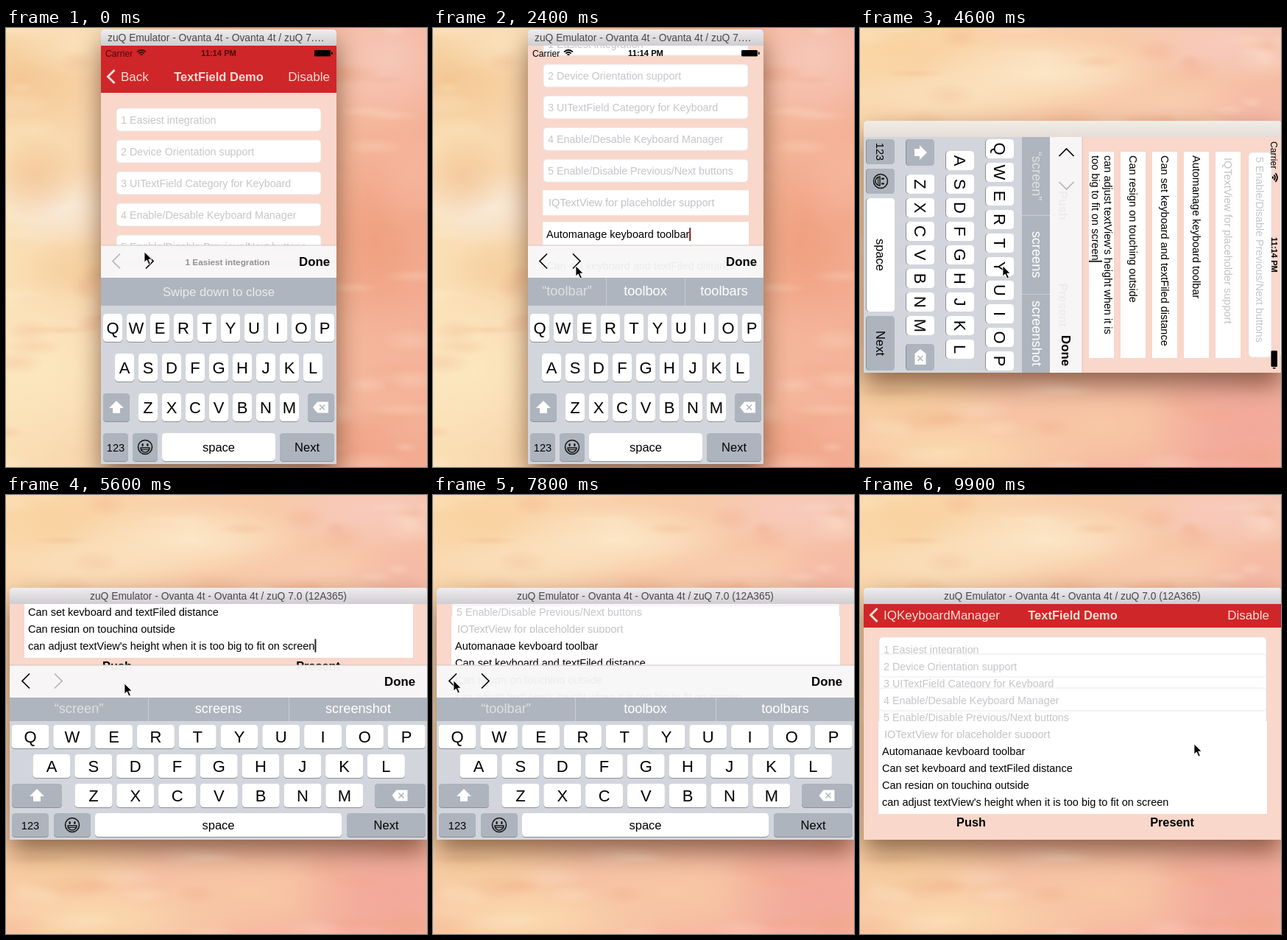
An HTML page with a canvas for the animation above (10 s loop, 572 by 596 pixels).

```html
<!DOCTYPE html>
<html lang="en">
<head>
<meta charset="utf-8">
<title>Keyboard toolbar demo</title>
<style>
html, body { margin: 0; width: 100%; height: 100%; overflow: hidden; }
canvas { display: block; }
</style>
</head>
<body>
<canvas id="stage" width="572" height="596"></canvas>
<script>
const ctx = document.getElementById('stage').getContext('2d');
const LOOP = 10000, TICK = 100, TURN = 4500, SPIN = 4900;
const SANS = '"Liberation Sans", Arial, sans-serif';
const PEACH = '#f9d7ca', RED = '#cf2629', DARK_KEY = '#adb4bd';
const TITLE = 'zuQ Emulator - Ovanta 4t - Ovanta 4t / zuQ 7.';

const FIELDS = ['1 Easiest integration', '2 Device Orientation support',
  '3 UITextField Category for Keyboard', '4 Enable/Desable Keyboard Manager',
  '5 Enable/Disable Previous/Next buttons', 'IQTextView for placeholder support',
  'Automanage keyboard toolbar', 'Can set keyboard and textFiled distance',
  'Can resign on touching outside',
  "can adjust textView's height when it is too big to fit on screen"];

const WORDS = {
  1: ['Swipe down to close'],
  7: ['“toolbar”', 'toolbox', 'toolbars'],
  8: ['“distance”', 'distances', 'distanced'],
  9: ['“outside”', 'outsider', 'outsiders'],
  10: ['“screen”', 'screens', 'screenshot']
};

const PORTRAIT = {
  x: 129, y: 24, w: 320, h: 568, nav: 64, navText: 42, back: 'Back', right: 440,
  fieldX: 150, fieldW: 278, fieldY: 109, step: 43, gap: 42, textY: 16, push: [222, 357, 564],
  arrows: [150, 195], titleX: 301, keysH: 215, predH: 38, padH: 216, bars: [235, 342],
  rowX: [145, 161, 193], rowY: 11, rowStep: 54, keyH: 38, keyW: 26, keyStep: 32,
  shift: [132, 36], del: [410, 36], bottom: [[132, 34], [172, 34], [212, 154], [372, 74]]
};
const LANDSCAPE = {
  wide: true, x: 5, y: 148, w: 568, h: 320, nav: 32, navText: 15, back: 'IQKeyboardManager', right: 556,
  fieldX: 26, fieldW: 526, fieldY: 193, step: 23, gap: 43, textY: 16.5, push: [151, 424, 444.5],
  arrows: [27, 71], titleX: 298, keysH: 161, predH: 32, padH: 162, bars: [193, 384],
  rowX: [33, 62, 119], rowY: 5, rowStep: 40, keyH: 32, keyW: 51, keyStep: 56.8,
  shift: [8, 68], del: [501, 69], bottom: [[8, 50], [65, 50], [121, 335], [463, 107]]
};

// [time, focused field]; 0 means the keyboard is dismissed
const FOCUS = [[0, 1], [300, 2], [600, 3], [900, 4], [1200, 5], [1700, 6], [2200, 7], [2800, 8],
  [3400, 9], [4000, 10], [6300, 9], [6900, 8], [7500, 7], [8000, 6], [8500, 5], [9400, 0]];
// [time, x, y]
const POINTER = [[0, 188, 304], [1200, 188, 305], [1400, 190, 335], [1700, 190, 337], [2000, 194, 323],
  [4700, 194, 323], [5600, 161, 256], [6200, 28, 252], [8400, 28, 252], [8800, 60, 265],
  [9300, 535, 283], [9900, 454, 338]];

const lerp = (a, b, p) => a + (b - a) * p;
const ease = p => { p = Math.min(1, Math.max(0, p)); return p * p * (3 - 2 * p); };

function rect(x, y, w, h, fill, radius = 0) {
  ctx.fillStyle = fill;
  ctx.beginPath();
  ctx.roundRect(x, y, w, h, radius);
  ctx.fill();
}

function line(points, color, width = 1) {
  ctx.strokeStyle = color;
  ctx.lineWidth = width;
  ctx.beginPath();
  points.forEach(([x, y], i) => i ? ctx.lineTo(x, y) : ctx.moveTo(x, y));
  ctx.stroke();
}

function shape(points, fill, stroke) {
  ctx.beginPath();
  points.forEach(([x, y]) => ctx.lineTo(x, y));
  ctx.closePath();
  ctx.fillStyle = fill;
  ctx.fill();
  if (stroke) { ctx.lineWidth = 1; ctx.strokeStyle = stroke; ctx.stroke(); }
}

// y is the middle of the capitals
function text(str, x, y, size, color, align = 'center', weight = 'normal') {
  ctx.font = `${weight} ${size}px ${SANS}`;
  ctx.textAlign = align;
  ctx.fillStyle = color;
  ctx.fillText(str, x, y + size * 0.35);
}

function fitText(str, width) {
  if (ctx.measureText(str).width <= width) return str;
  while (ctx.measureText(str + '…').width > width) str = str.slice(0, -1);
  return str + '…';
}

function glow(x, y, rx, ry, color, alpha) {
  ctx.save();
  ctx.translate(x, y);
  ctx.scale(rx, ry);
  const g = ctx.createRadialGradient(0, 0, 0, 0, 0, 1);
  g.addColorStop(0, color);
  g.addColorStop(0.45, color + '99');
  g.addColorStop(1, color + '00');
  ctx.globalAlpha = alpha;
  ctx.fillStyle = g;
  ctx.fillRect(-1, -1, 2, 2);
  ctx.restore();
}

const SKY = [
  { from: '#fae0b4', to: '#f3ac92', end: [572, 0], seed: 7, glows: [
    [20, 70, 130, 90, '#f3c48f'], [110, 20, 110, 50, '#fbe3bd'], [70, 245, 110, 55, '#f8ecdf'],
    [40, 200, 60, 60, '#f4c79a'], [95, 330, 80, 45, '#f5cf9d'], [50, 460, 150, 120, '#fce9c2'],
    [520, 40, 130, 110, '#f7cbbd'], [500, 290, 90, 130, '#ef9d7c'], [555, 190, 70, 90, '#f6b69d'],
    [530, 470, 110, 110, '#f5b79f'], [470, 570, 100, 60, '#f0a286']] },
  { from: '#fbdcae', to: '#f4b2a0', end: [572, 420], seed: 19, glows: [
    [60, 30, 150, 60, '#f9d2a0'], [250, 60, 170, 50, '#fcebcb'], [130, 90, 140, 40, '#fae3c0'],
    [500, 20, 140, 60, '#f7cbc1'], [420, 100, 130, 35, '#f9cdb0'], [540, 110, 80, 50, '#f5b9a7'],
    [60, 500, 150, 70, '#f6cf9c'], [130, 575, 190, 55, '#fbddad'], [330, 540, 160, 70, '#f8caa4'],
    [530, 540, 140, 100, '#f2a798']] }
];

function drawSky({ from, to, end, seed, glows }) {
  const g = ctx.createLinearGradient(0, 0, ...end);
  g.addColorStop(0, from);
  g.addColorStop(1, to);
  rect(0, 0, 572, 596, g);
  for (const [x, y, rx, ry, color] of glows) glow(x, y, rx, ry, color, 0.85);
  const rnd = () => (seed = seed * 16807 % 2147483647) / 2147483647;
  for (let i = 0; i < 90; i++) {
    glow(rnd() * 572, rnd() * 596, 15 + rnd() * 40, 6 + rnd() * 14, rnd() < 0.5 ? '#fff0d8' : '#ee9f78', 0.22);
  }
}

function drawWindow(L, title) {
  const top = L.y - 22;
  ctx.save();
  ctx.shadowColor = 'rgba(70,35,15,.6)';
  ctx.shadowBlur = 34;
  ctx.shadowOffsetY = 16;
  rect(L.x, top, L.w, L.h + 22, '#ddd', [5, 5, 2, 2]);
  ctx.restore();
  const g = ctx.createLinearGradient(0, top, 0, L.y);
  g.addColorStop(0, title ? '#efedef' : '#f1ece6');
  g.addColorStop(1, title ? '#cfcdd0' : '#e4ded7');
  rect(L.x, top, L.w, 22, g, [5, 5, 0, 0]);
  if (title) text(title, L.wide ? 288.5 : 138, top + 11.5, 13.8, '#4a484a', L.wide ? 'center' : 'left');
}

const chevron = (x, y, dir, size, color, width) =>
  line([[x - dir * size / 2, y - size], [x + dir * size / 2, y], [x - dir * size / 2, y + size]], color, width);

function drawCaret(x, y, field) {
  rect(x, y - 9, 2, 18, field <= 5 ? '#3f6fe0' : field === 10 ? '#222' : '#8c1a1a');
}

function drawForm(L, scroll, field, caretOn) {
  ctx.save();
  ctx.translate(0, -scroll);
  rect(L.x, L.y, L.w, L.h + 300, PEACH);
  rect(L.x, L.y, L.w, L.nav, RED);
  const navY = L.y + L.navText, pale = '#fadfd5';
  chevron(L.x + 14, navY, -1, 9, pale, 3);
  text(L.back, L.x + 27, navY, 17, pale, 'left');
  text('TextField Demo', 289, navY, 16.5, pale, 'center', 'bold');
  text('Disable', L.right, navY, 17, pale, 'right');

  text('Push', L.push[0], L.push[2], 16.3, '#000', 'center', 'bold');
  text('Present', L.push[1], L.push[2], 16.3, '#000', 'center', 'bold');

  for (const n of [1, 3, 5, 2, 4, 6, 7, 8, 9, 10]) {
    const y = L.fieldY + (n - 1) * L.step, label = FIELDS[n - 1], focused = n === field && caretOn;
    if (n <= 5) {
      rect(L.fieldX, y, L.fieldW, 31, '#fff', 5);
      ctx.strokeStyle = '#e6e2e2';
      ctx.lineWidth = 0.8;
      ctx.stroke();
      text(label, L.fieldX + 6, y + L.textY, 14.3, '#c6c6ca', 'left');
      if (focused) drawCaret(L.fieldX + 6, y + 16, n);
      continue;
    }
    rect(L.fieldX - 1, y - 1, L.fieldW + 2, 34, '#fff');
    const two = n === 10 && !L.wide, cut = label.indexOf('too');
    const last = two ? label.slice(cut) : label;
    const x = L.fieldX + (n === 6 ? 7 : 4), lastY = y + (two ? 24 : L.textY);
    if (two) text(label.slice(0, cut), x, y + 7, 14.5, '#000', 'left');
    text(last, x, lastY, 14.5, n === 6 ? '#c2c2c6' : '#000', 'left');
    if (focused) drawCaret(x + (n === 6 ? 0 : ctx.measureText(last).width), lastY, n);
  }
  ctx.restore();
}

function drawStatus(overNav) {
  const ink = overNav ? '#4d0b0d' : '#000';
  text('Carrier', 135, 34.5, 12.2, ink, 'left');
  text('11:14 PM', 289, 34.5, 11.2, ink, 'center', 'bold');
  ctx.strokeStyle = ink;
  ctx.lineWidth = 1.8;
  for (const r of [2, 5, 8]) {
    ctx.beginPath();
    ctx.arc(184, 38, r, -Math.PI * 0.76, -Math.PI * 0.24);
    ctx.stroke();
  }
  rect(419, 30, 22, 8.5, '#000', 1.5);
  rect(442, 32.5, 1.5, 3.5, '#000');
}

function backspace(x, y, fill, mark) {
  shape([[x - 11, y], [x - 5, y - 7.5], [x + 10, y - 7.5], [x + 10, y + 7.5], [x - 5, y + 7.5]], fill);
  line([[x - 2, y - 3.5], [x + 5, y + 3.5]], mark, 1.5);
  line([[x + 5, y - 3.5], [x - 2, y + 3.5]], mark, 1.5);
}

function drawSmiley(x, y) {
  ctx.strokeStyle = ctx.fillStyle = '#111';
  ctx.lineWidth = 1.5;
  ctx.beginPath();
  ctx.arc(x, y, 9.5, 0, 7);
  ctx.stroke();
  rect(x - 4.5, y - 5, 2.2, 4, '#111', 1);
  rect(x + 2.3, y - 5, 2.2, 4, '#111', 1);
  ctx.beginPath();
  ctx.arc(x, y + 1, 6, 0, Math.PI);
  ctx.closePath();
  ctx.stroke();
  line([[x - 5, y + 3.5], [x + 5, y + 3.5]], '#111', 1);
}

function drawWords(L, y, words) {
  rect(L.x, y, L.w, L.predH, '#aeb5be');
  const mid = y + L.predH / 2 - (L.wide ? 1 : 0);
  if (words.length === 1) return text(words[0], 289, mid, 16.7, '#e9ebee');
  const edges = [L.x, ...L.bars, L.x + L.w];
  words.forEach((word, i) => {
    if (i) rect(edges[i], y, 1, L.predH, '#c9ced4');
    text(word, (edges[i] + edges[i + 1]) / 2, mid - (L.wide ? 0 : 1), 18.2, i ? '#fff' : '#dde0e4');
  });
}

function drawLetters(L, top) {
  rect(L.x, top, L.w, L.keysH + 60, '#d2d6dc');
  const rowTop = r => top + L.rowY + r * L.rowStep;
  const key = ([x, w], r, label, size, dark) => {
    const y = rowTop(r);
    rect(x, y + 1, w, L.keyH, '#8b8f95', 4.5);
    rect(x, y, w, L.keyH, dark ? DARK_KEY : '#fff', 4.5);
    text(label, x + w / 2, y + L.keyH / 2 + 0.5, size, '#000');
    return [x + w / 2, y + L.keyH / 2];
  };
  ['QWERTYUIOP', 'ASDFGHJKL', 'ZXCVBNM'].forEach((row, r) => {
    [...row].forEach((c, i) => key([L.rowX[r] + i * L.keyStep - L.keyW / 2, L.keyW], r, c, 22));
  });
  const [sx, sy] = key(L.shift, 2, '', 16, true);
  shape([[sx, sy - 9], [sx + 10, sy + 1], [sx + 5, sy + 1], [sx + 5, sy + 8], [sx - 5, sy + 8],
    [sx - 5, sy + 1], [sx - 10, sy + 1]], '#fff');
  backspace(...key(L.del, 2, '', 16, true), '#fff', DARK_KEY);
  key(L.bottom[0], 3, '123', 14.6, true);
  drawSmiley(...key(L.bottom[1], 3, '', 16, true));
  key(L.bottom[2], 3, 'space', 16.5);
  key(L.bottom[3], 3, 'Next', 16.5, true);
}

function drawPad(L, top) {
  const h = L.padH / 4, cols = L.wide ? [5, 194, 384, 573] : [129, 234, 345, 449];
  const letters = ['', 'ABC', 'DEF', 'GHI', 'JKL', 'MNO', 'PQRS', 'TUV', 'WXYZ'];
  rect(L.x, top, L.w, L.padH + 60, '#c2c6cb');
  for (let i = 0; i < 12; i++) {
    const c = i % 3, r = Math.floor(i / 3), x = cols[c], y = top + r * h;
    const mid = (cols[c] + cols[c + 1]) / 2 + (L.wide ? 0 : [2, 0, 2][c]);
    if (r < 3 || c === 1) rect(x, y, cols[c + 1] - x - 1, h - 1, '#fff');
    if (r < 3) {
      text(i + 1, mid, y + h * 0.38, L.wide ? 24 : 29, '#000');
      text(letters[i], mid, y + h * 0.77, L.wide ? 9.5 : 11.5, '#000');
    } else if (c === 1) text('0', mid, y + h / 2, L.wide ? 24 : 29, '#000');
    else if (c === 2) backspace(mid, y + h / 2, '#000', '#c2c6cb');
  }
}

function drawKeyboard(L, top, field) {
  rect(L.x, top, L.w, 44, 'rgba(248,247,248,.955)');
  rect(L.x, top - 0.5, L.w, 1, '#d0c6c4');
  const mid = top + 22;
  chevron(L.arrows[0], mid - 0.5, -1, 10, field === 1 ? '#b5b3b4' : '#000', 1.7);
  chevron(L.arrows[1], mid - 0.5, 1, 10, field === 10 ? '#b5b3b4' : '#000', 1.7);
  text('Done', L.right, mid, 16.8, '#000', 'right', 'bold');
  if (field <= 5) {
    ctx.font = `bold 11.75px ${SANS}`;
    text(fitText(FIELDS[field - 1], L.wide ? 400 : 181), L.titleX, mid + 0.5, 11.75, '#929094', 'center', 'bold');
  }
  if (field === 5) return drawPad(L, top + 44);
  drawWords(L, top + 44, WORDS[field] || ['I', 'The', 'I’m']);
  drawLetters(L, top + 44 + L.predH);
}

function layoutFor(L, field) {
  const bottom = L.y + L.h;
  if (!field) return { top: bottom + 1, scroll: 0 };
  const top = bottom - 44 - (field === 5 ? L.padH : L.keysH + L.predH);
  return { top, scroll: Math.max(0, L.fieldY + (field - 1) * L.step + L.gap - top) };
}

function drawScreen(L, t) {
  const now = FOCUS.findLastIndex(([at]) => at <= t);
  const [start, field] = FOCUS[now], before = FOCUS[Math.max(0, now - 1)][1];
  const a = layoutFor(L, before), b = layoutFor(L, field), p = ease((t - start) / 300);
  const scroll = lerp(a.scroll, b.scroll, p), blink = t % 1000;
  ctx.save();
  ctx.beginPath();
  ctx.rect(L.x, L.y, L.w, L.h);
  ctx.clip();
  drawForm(L, scroll, field, blink >= 200 && blink < 750);
  if (!L.wide) drawStatus(scroll < 54);
  if (field || p < 1) drawKeyboard(L, lerp(a.top, b.top, p), field || before);
  ctx.restore();
}

function drawTurned(L, t, angle, alpha) {
  ctx.save();
  ctx.globalAlpha = alpha;
  ctx.translate(289, 308);
  ctx.rotate(angle);
  ctx.translate(-289, -308);
  drawScreen(L, t);
  ctx.restore();
}

function drawPointer(t) {
  const i = Math.max(1, POINTER.findIndex(([at]) => at >= t));
  const [t0, x0, y0] = POINTER[i - 1], [t1, x1, y1] = POINTER[i];
  const p = ease((t - t0) / (t1 - t0)), x = lerp(x0, x1, p), y = lerp(y0, y1, p);
  if (FOCUS.some(([at]) => at && t >= at - 100 && t < at + 100)) {
    ctx.strokeStyle = '#0a0a0a';
    ctx.lineWidth = 3;
    ctx.beginPath();
    ctx.arc(x, y + 2, 21, 0, 7);
    ctx.stroke();
  }
  const arrow = [[0, 0], [0, 14], [3.3, 11], [6, 17], [8.3, 16], [5.7, 10.2], [10, 10]];
  shape(arrow.map(([dx, dy]) => [x + dx, y + dy]), '#000', 'rgba(255,255,255,.8)');
}

function draw(t) {
  const wide = t >= TURN, L = wide ? LANDSCAPE : PORTRAIT;
  drawSky(SKY[+wide]);
  drawWindow(L, wide ? (t >= SPIN ? TITLE + '0 (12A365)' : '') : TITLE + '…');
  const p = ease((t - SPIN) / 400), angle = Math.PI / 2 * (1 - p);
  if (!wide || p === 1) drawScreen(L, t);
  else {
    ctx.save();
    ctx.beginPath();
    ctx.rect(L.x, L.y, L.w, L.h);
    ctx.clip();
    rect(L.x, L.y, L.w, L.h, '#000');
    drawTurned(PORTRAIT, t, angle, 1);
    if (p > 0) drawTurned(LANDSCAPE, t, angle, p);
    ctx.restore();
  }
  drawPointer(t);
}

const begin = performance.now();
let shown = -1;
function frame() {
  const t = Math.floor((performance.now() - begin) % LOOP / TICK) * TICK;
  if (t !== shown) draw(shown = t);
  requestAnimationFrame(frame);
}
frame();
</script>
</body>
</html>
```
